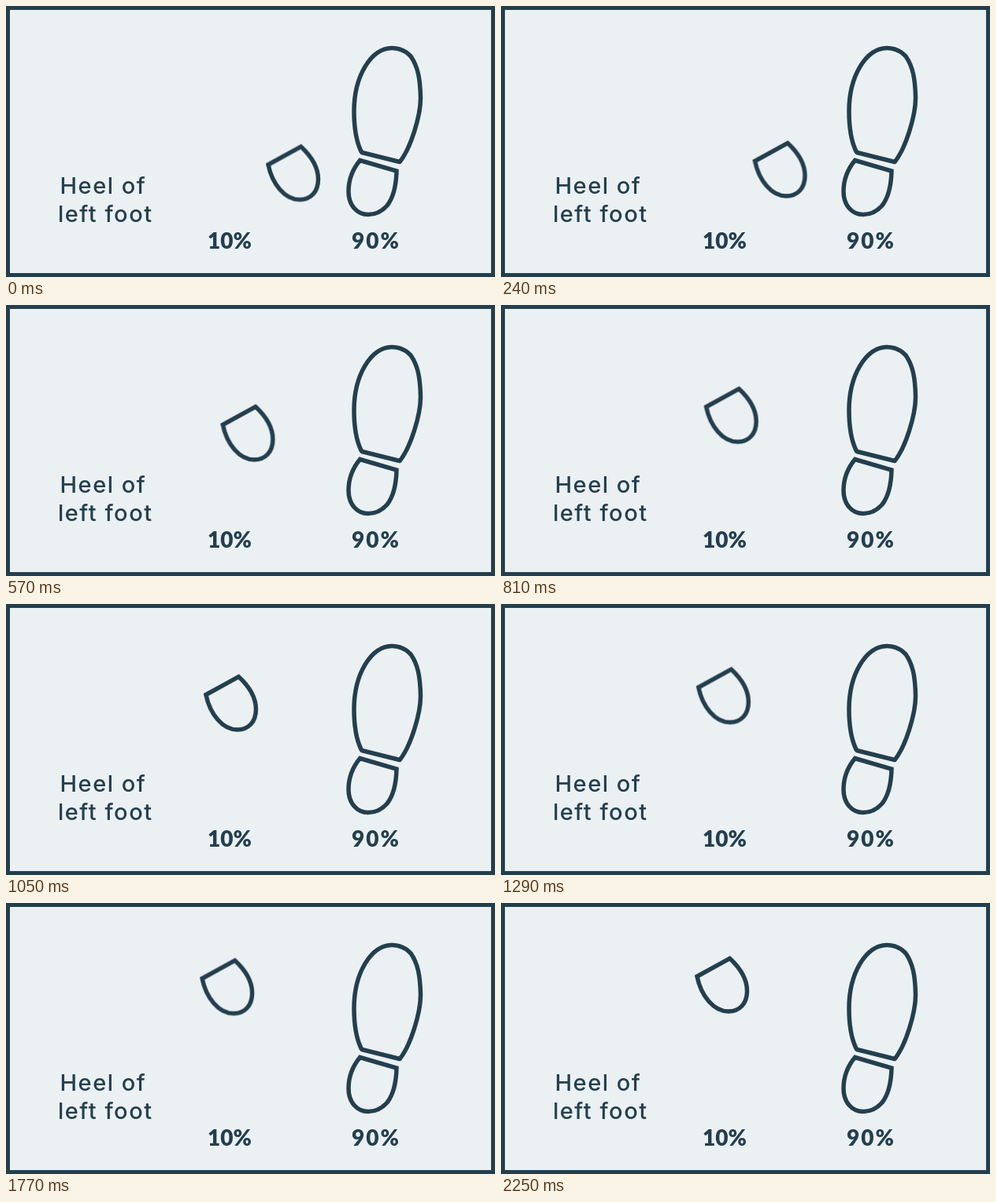
These frames come from a looping animation (621x345 px, 2820 ms). An HTML page:

```html
<!DOCTYPE html>
<html lang="en">
<head>
<meta charset="utf-8">
<title>Heel of left foot</title>
<style>
  html, body { margin: 0; width: 100%; height: 100%; overflow: hidden; background: #ebf0f3; }
  svg { display: block; width: 621px; height: 345px; }
  .line { fill: none; stroke: #233f4e; stroke-width: 5.5; stroke-linejoin: miter; }
  text { fill: #233f4e; }
  .label { font: 500 29px Inter, sans-serif; letter-spacing: 1.5px; }
  .share { font: 900 28px Lato, sans-serif; }
  .wide { letter-spacing: 2px; }
</style>
</head>
<body>
<svg viewBox="0 0 621 345">
  <rect width="621" height="345" fill="#233f4e"/>
  <rect x="5" y="5" width="611" height="335" fill="#ebf0f3"/>

  <g class="line">
    <path d="M452 186.500L500 198.500C514 181 526.500 140 526.500 117C526 92 523 77 514 64C507 56.500 498 53.500 490 53.500C463 54 442 90 442 134C442 157 445 172 450.500 184Q451 186 453.500 186.700Z" stroke-linejoin="round"/>
    <path d="M449.500 196.500L496 210C495.500 230 491 245 484 254C477 262 469 265.500 460 265.500C446 265.500 435 254 435 236C435 222 440 208 449.500 196.500Z"/>
    <path id="heel" d="M249 93.500L290.500 70.500C304 83 312.500 98 312.500 112C312.500 128 303 138 289 138C270 138 254 118 249 93.500Z"/>
  </g>

  <text class="label" x="68.500" y="239">Heel of</text>
  <text class="label" x="66" y="275">left foot</text>
  <text class="share" x="256" y="309">10%</text>
  <text class="share wide" x="439" y="309">90%</text>
</svg>
<script>
  const LOOP = 2820, MOVE = 2250, STEP = 30;

  // The heel's offset from its resting place follows this curve at an eased pace.
  const route = document.createElementNS('http://www.w3.org/2000/svg', 'path');
  route.setAttribute('d', 'M84 108.500C54 100 0 36 0 0');
  const length = route.getTotalLength();

  // Same as cubic-bezier(.28, 0, .02, 1)
  function ease(t) {
    let lo = 0, hi = 1;
    for (let i = 0; i < 30; i++) {
      const u = (lo + hi) / 2, v = 1 - u;
      const x = 3 * 0.28 * u * v * v + 3 * 0.02 * u * u * v + u * u * u;
      if (x < t) lo = u; else hi = u;
    }
    return lo * lo * (3 - 2 * lo);
  }

  function pose(time) {
    const p = route.getPointAtLength(length * ease(Math.min(time / MOVE, 1)));
    return `translate(${p.x.toFixed(2)}px, ${p.y.toFixed(2)}px)`;
  }

  const keys = [];
  for (let t = 0; t <= MOVE; t += STEP) {
    keys.push({ offset: Math.max(0, t - 1) / LOOP, transform: pose(t), easing: 'step-end' });
  }
  keys.push({ offset: 1, transform: pose(MOVE) });

  document.getElementById('heel').animate(keys, { duration: LOOP, iterations: Infinity });
</script>
</body>
</html>
```
